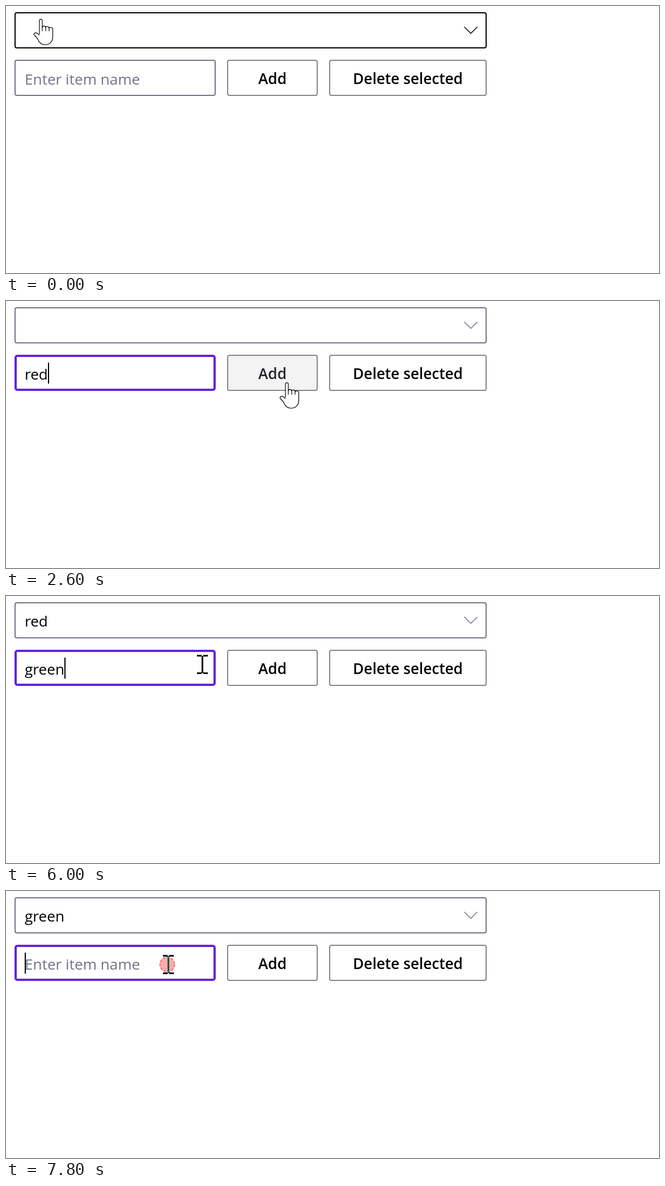
Animation, 1152 px wide and 472 px high, one loop 8000 ms. Source, as an HTML page with a canvas:

```html
<!DOCTYPE html>
<html lang="en">
<head>
<meta charset="utf-8">
<title>Item list form</title>
<style>
  html, body { margin: 0; width: 100%; height: 100%; overflow: hidden; background: #fff; }
  canvas { display: block; width: 1152px; height: 472px; }
</style>
</head>
<body>
<canvas id="stage" width="1152" height="472"></canvas>
<script>
const ctx = document.getElementById('stage').getContext('2d');
const LOOP = 8000, TICK = 200;
const GREY = '#747389', EDGE = '#868686', VIOLET = '#6425d8';

// Pointer stops: time, x, y, shape
const pointer = [
  [0, 61.5, 23.5, 'hand'], [200, 63.5, 29.5, 'hand'], [400, 77.5, 54.5, 'hand'],
  [600, 101, 116, 'beam'], [800, 109, 127, 'beam'], [1000, 110, 129, 'beam'],
  [2200, 205, 137, 'beam'], [2400, 434.5, 144.5, 'hand'], [2600, 495.5, 144.5, 'hand'],
  [2800, 500.5, 146.5, 'hand'], [3200, 498.5, 141.5, 'hand'], [3400, 420.5, 130.5, 'hand'],
  [3600, 337, 122, 'beam'], [3800, 325, 123, 'beam'], [4000, 319, 124, 'beam'],
  [6000, 347, 121, 'beam'], [6200, 399.5, 122.5, 'hand'], [6400, 432.5, 124.5, 'hand'],
  [6600, 446.5, 125.5, 'hand'], [6800, 448.5, 126.5, 'hand'],
  [7200, 371.5, 125.5, 'arrow'], [7400, 309, 129, 'beam'], [7600, 290, 130, 'beam'],
  [7800, 287, 130, 'beam']
];

// Clicks: time, x, y, starting radius
const clicks = [
  [1000, 109, 128, 13], [2800, 501, 147, 19], [4200, 319, 124.5, 13],
  [7000, 449, 125.5, 13], [7800, 284.5, 130, 13]
];

const typed = [
  [0, ''], [1400, 'r'], [1600, 're'], [1800, 'red'], [3000, ''],
  [4800, 'g'], [5200, 'gr'], [5400, 'gre'], [5600, 'gree'], [6000, 'green'], [7200, '']
];
const chosen = [[0, ''], [3000, 'red'], [7200, 'green']];
const focus = [[0, false], [1000, true], [2800, false], [4200, true], [7000, false], [7800, true]];

const select = [15, 11, 833, 64], field = [15, 95, 355, 64];
const addBox = [390, 95, 160, 64], deleteBox = [570, 95, 278, 64];

const at = (track, t) => track.filter(k => k[0] <= t).pop();
const inside = ([bx, by, w, h], x, y) => x >= bx && x < bx + w && y >= by && y < by + h;

function box([x, y, w, h], color, line = 2, fill = '#fff') {
  ctx.beginPath();
  ctx.roundRect(x + line / 2, y + line / 2, w - line, h - line, 3);
  ctx.fillStyle = fill;
  ctx.fill();
  ctx.strokeStyle = color;
  ctx.lineWidth = line;
  ctx.stroke();
}

function text(s, x, y, color, weight = 400, align = 'left') {
  ctx.font = weight + ' 26.2px "Open Sans", "Noto Sans", sans-serif';
  ctx.textAlign = align;
  ctx.fillStyle = color;
  ctx.fillText(s, x, y);
}

function button(b, label, hover) {
  box(b, EDGE, 2, hover ? '#f3f3f3' : '#fff');
  text(label, b[0] + b[2] / 2, 138, hover ? '#24242f' : '#000', 600, 'center');
}

function chevron(color) {
  ctx.beginPath();
  ctx.moveTo(808.5, 37);
  ctx.lineTo(820, 48.5);
  ctx.lineTo(831.5, 37);
  ctx.strokeStyle = color;
  ctx.lineWidth = 1.5;
  ctx.stroke();
}

function ripple([start, x, y, r0], t) {
  const r = r0 + (t - start) / TICK * 6;
  if (t < start || r > 25) return;
  const fade = 1 - (r - 13) / 15;
  ctx.beginPath();
  ctx.arc(x, y, r, 0, Math.PI * 2);
  ctx.fillStyle = `rgba(255,70,70,${0.45 * fade})`;
  ctx.fill();
  ctx.setLineDash([5, 2.5]);
  ctx.strokeStyle = `rgba(255,60,60,${0.75 * fade})`;
  ctx.lineWidth = 1.8;
  ctx.stroke();
  ctx.setLineDash([]);
}

const outlines = {
  hand: new Path2D('M-2.5 26 V2.5 C-2.5 -1 2.5 -1 2.5 2.5 V14 C3 11 8 11 8.5 14.5 ' +
    'C9 12 14 12 14.5 15.5 C16 13.5 21 14 21 18 V31 C21 40 15 45 7.5 45 ' +
    'C1 45 -3 41 -5 36 C-6.5 32.5 -9 30.5 -11.5 28 C-13.5 25.5 -9.5 22.5 -6.5 24.5 L-2.5 28'),
  knuckles: new Path2D('M2.5 13 V21 M8.5 14 V21 M14.5 15 V21'),
  arrow: new Path2D('M0 0 V32.5 L7.5 25.5 L12.5 37 L17 35 L12.3 24.5 H24 Z')
};

function drawPointer(x, y, shape) {
  ctx.save();
  ctx.translate(x, y);
  if (shape === 'beam') {
    // The text pointer inverts whatever lies below it
    ctx.globalCompositeOperation = 'difference';
    ctx.fillStyle = '#fff';
    for (const top of [-17, 14]) {
      ctx.fillRect(-10, top, 8, 3);
      ctx.fillRect(1, top, 8, 3);
    }
    ctx.fillRect(-2, -15, 3, 30);
  } else {
    ctx.fillStyle = '#fff';
    ctx.strokeStyle = '#000';
    ctx.lineWidth = 1.2;
    ctx.lineJoin = 'round';
    ctx.fill(outlines[shape]);
    ctx.stroke(outlines[shape]);
    if (shape === 'hand') ctx.stroke(outlines.knuckles);
  }
  ctx.restore();
}

function draw(t) {
  const [, x, y, shape] = at(pointer, t);
  const value = at(typed, t)[1], focused = at(focus, t)[1];
  const overSelect = inside(select, x, y);

  ctx.fillStyle = '#fff';
  ctx.fillRect(0, 0, 1152, 472);

  box(select, overSelect ? '#000' : GREY);
  chevron(overSelect ? '#000' : GREY);
  text(at(chosen, t)[1], 33, 54, '#000');

  if (focused) box(field, VIOLET, 4);
  else box(field, inside(field, x, y) && shape === 'beam' ? '#000' : GREY);
  text(value || 'Enter item name', 33, 139, value ? '#000' : GREY);
  if (focused) {
    const caret = 33 + (value ? Math.round(ctx.measureText(value).width) : 0);
    ctx.fillStyle = '#000';
    ctx.fillRect(caret, 109, 2, 37);
  }

  // The pressed button keeps its tint while the pointer leaves it
  button(addBox, 'Add', inside(addBox, x, y) || t === 7200);
  button(deleteBox, 'Delete selected', false);

  clicks.forEach(c => ripple(c, t));
  drawPointer(x, y, shape);
}

function loop() {
  const t = performance.now() % LOOP;
  draw(Math.floor(t / TICK) * TICK);
  requestAnimationFrame(loop);
}
loop();
</script>
</body>
</html>
```
